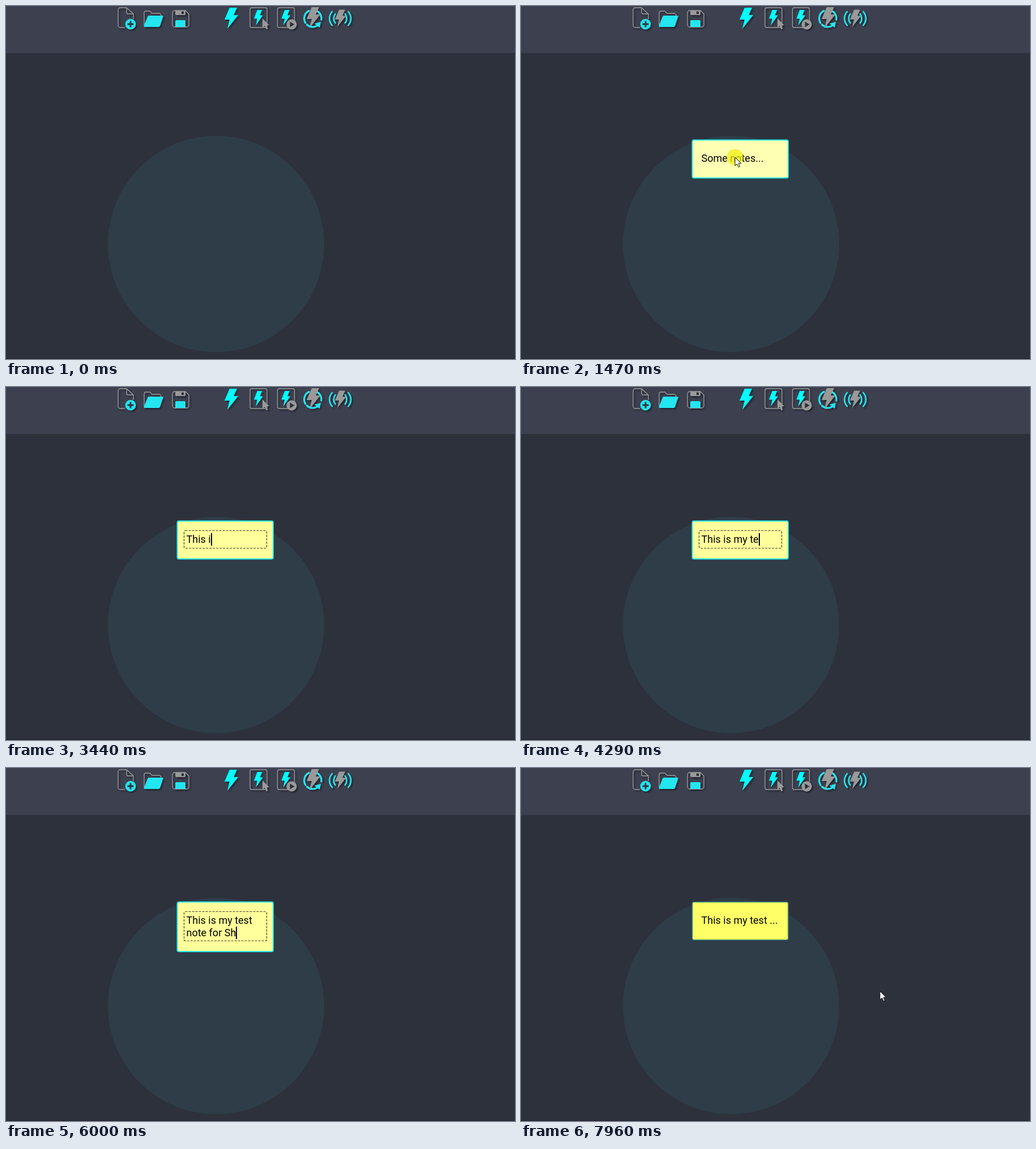
Animation of 899 by 623 pixels, one loop 8 s. Source, as an HTML page:

```html
<!DOCTYPE html>
<html lang="en">
<head>
<meta charset="utf-8">
<title>Editing a note</title>
<style>
  html, body { margin: 0; width: 100%; height: 100%; overflow: hidden; background: #2d313b; }
  svg { display: block; }
  text { font: 18px Roboto, "Liberation Sans", sans-serif; white-space: pre; }
  .icon { filter: url(#shade); }
  .line { fill: none; stroke: #999; stroke-width: 1.3; stroke-linejoin: round; }
  .grey { fill: #999; }
  .cyan { fill: #22e6f0; }
  .bright { fill: #0ff; }
  .dark { fill: #2d313b; }
  .wave { fill: none; stroke: #22e6f0; stroke-width: 2.6; stroke-linecap: round; }
</style>
</head>
<body>
<svg width="899" height="623" viewBox="0 0 899 623">
  <defs>
    <path id="bolt" d="M9 0H22L16 13H24L5 37L9 21H0Z"/>
    <path id="arrow" d="M0 0V15L3.6 11.8L6.2 17.5L8.6 16.4L6 10.9H10.8Z"/>
    <g id="page">
      <rect class="line" x="431" y="3" width="30" height="35" rx="3"/>
      <use href="#bolt" class="bright" transform="translate(438 7) scale(.65 .73)"/>
    </g>
    <filter id="shade" x="-20%" y="-20%" width="150%" height="150%">
      <feDropShadow dx="2.5" dy="2.5" stdDeviation=".8" flood-color="#20232c" flood-opacity=".85"/>
    </filter>
  </defs>

  <rect width="899" height="623" fill="#2d313b"/>
  <circle cx="371" cy="420" r="191" fill="#2e3d48"/>
  <rect width="899" height="83" fill="#3d414f"/>
  <rect y="622" width="899" height="1" fill="#23252d"/>

  <!-- toolbar -->
  <g class="icon">
    <path class="line" d="M210 38H202a4 4 0 0 1-4-4V7a4 4 0 0 1 4-4H213L225 14V23M213 3V11a3 3 0 0 0 3 3H225"/>
    <circle class="cyan" cx="220" cy="32" r="9.3"/>
    <path d="M220 26.5v11M214.5 32h11" stroke="#2d313b" stroke-width="3"/>
  </g>
  <g class="icon">
    <path class="line" d="M244 34V12a3 3 0 0 1 3-3H254L258 13H270a4 4 0 0 1 4 4"/>
    <path class="cyan" d="M253 17H276q2 0 1.4 2L272 35q-.6 2-3 2H245q-2 0-1.4-2L250 19q.7-2 3-2Z"/>
  </g>
  <g class="icon">
    <path class="line" d="M298 8H317L323 14V33a4 4 0 0 1-4 4H298a4 4 0 0 1-4-4V12a4 4 0 0 1 4-4Z"/>
    <path class="grey" d="M299 8H317V14a2 2 0 0 1-2 2H301a2 2 0 0 1-2-2ZM310 9.5v4.5h4v-4.5z"/>
    <path class="cyan" d="M299 37V27a2 2 0 0 1 2-2H315a2 2 0 0 1 2 2V37Z"/>
  </g>
  <use href="#bolt" class="icon bright" x="386" y="3"/>
  <g class="icon">
    <use href="#page"/>
    <use href="#arrow" class="grey" transform="translate(453 22) scale(1.1)"/>
  </g>
  <g class="icon">
    <use href="#page" x="48.5"/>
    <circle class="grey" cx="504.5" cy="32.5" r="9"/>
    <path class="dark" d="M501.5 27.5V37.5L509.5 32.5Z"/>
  </g>
  <g class="icon">
    <path class="wave" style="stroke-width:3.2" d="M535 8.5A15 15 0 0 0 529 30M531.5 33A15 15 0 0 0 550 34.5M549 8.5A15 15 0 0 1 557 24"/>
    <path class="cyan" d="M545 31L556 28L554 38Z"/>
    <use href="#bolt" class="grey" x="531" y="2"/>
  </g>
  <g class="icon">
    <path id="waves" class="wave" d="M576 10A18 18 0 0 0 576 34M581.5 14A13 13 0 0 0 581.5 30"/>
    <use href="#waves" transform="translate(1180.5 0) scale(-1 1)"/>
    <use href="#bolt" class="grey" transform="translate(581 6.5) scale(.82)"/>
  </g>

  <!-- note -->
  <g id="note">
    <rect id="card" x="302.5" y="236.5" width="169.5" rx="3"/>
    <rect id="frame" x="314.5" y="253.5" width="146" rx="2" fill="none"
          stroke="#3c3c34" stroke-width="1.2" stroke-dasharray="4 2"/>
    <rect id="mark" x="318" y="257" width="111" height="23" fill="#0078d7"/>
    <text id="row1" x="318.5" y="275"></text>
    <text id="row2" x="318.5" y="297"></text>
    <rect id="caret" width="2" height="22"/>
  </g>

  <circle id="spot" r="14.5" fill="#eeee10" fill-opacity=".72"/>
  <use id="mouse" href="#arrow" fill="#fff" stroke="#111"/>
</svg>

<script>
const LOOP = 8000, TICK = 85.5, ROW = 22;
const NOTE_IN = 1120, HOVER = 1470, EDIT = 1720, LEAVE = 1980, SAVE = 7610;
const $ = id => document.getElementById(id);
const pen = document.createElement('canvas').getContext('2d');
pen.font = '18px Roboto, "Liberation Sans", sans-serif';

// bursts of typing, one key per tick
const bursts = [
  ['T', 2750], ['hi', 2920], ['s ', 3190], ['is ', 3440], ['m', 3780], ['y tes', 3960],
  ['t ', 4550], ['note ', 4720], ['for ', 5240], ['S', 5650], ['h', 6000], ['o', 6170], ['p', 6330]
];
const keys = bursts.flatMap(([s, at]) => [...s].map((char, i) => ({ char, at: at + i * TICK })));
const firstRow = 'This is my test '.length;

// each move lasts until the next one, or until it is hidden
const enter = [795, 607], edge = [378, 267], note = [386, 270], away = [865, 454];
const back = [811, 440], click = [640, 503], rest = [634, 394];
const moves = [
  { at: 90, end: 680, from: enter, to: edge },
  { at: HOVER - 10, end: HOVER, from: edge, to: note },
  { at: LEAVE - TICK, end: 2220, from: note, to: away, hide: 2320 },
  { at: 7280, end: 7440, from: back, to: click },
  { at: SAVE, end: 7940, from: click, to: rest }
];
const clicks = [600, HOVER, HOVER + 2 * TICK, SAVE];

const show = (el, on) => el.setAttribute('visibility', on ? 'visible' : 'hidden');
const set = (el, attrs) => { for (const k in attrs) el.setAttribute(k, attrs[k]); };
const ramp = (t, from, to) => Math.min(1, Math.max(0, (t - from) / (to - from)));
const ease = p => p * p * (3 - 2 * p);
const lerp = (a, b, p) => a.map((v, i) => v + (b[i] - v) * p);
const mix = (a, b, p) => `rgb(${lerp(a, b, p).map(Math.round)})`;

function drawNote(t) {
  const typed = keys.filter(k => t >= k.at);
  const text = typed.map(k => k.char).join('');
  const editing = t >= EDIT && t < SAVE;
  const selected = editing && !text;

  let top = text.slice(0, firstRow) || 'Some notes...';
  let bottom = text.slice(firstRow);
  if (t >= SAVE) [top, bottom] = ['This is my test ...', ''];
  $('row1').textContent = top;
  $('row2').textContent = bottom;
  $('row1').setAttribute('fill', selected ? '#fff' : '#000');

  const extra = bottom ? ROW - 1.5 : 0;
  const hover = t >= HOVER && t < LEAVE;
  const blur = ramp(t, SAVE, 7940);
  set($('card'), {
    height: 67 + extra,
    fill: hover ? '#ffffb4' : mix([255, 255, 155], [255, 255, 102], blur),
    stroke: mix([38, 232, 232], [48, 126, 122], blur),
    'stroke-width': 2 - blur * .4
  });
  $('frame').setAttribute('height', 31 + extra);
  set($('caret'), {
    x: Math.round(318.5 + pen.measureText(bottom || top).width),
    y: bottom ? 258 + ROW : 258
  });

  // the caret stays on right after a key, then blinks
  const idle = t - (typed.length ? typed[typed.length - 1].at : EDIT);
  const blink = Math.floor((idle + 150) / 420) % 2 === 0;
  show($('note'), t >= NOTE_IN);
  $('note').style.display = t >= NOTE_IN ? '' : 'none';
  show($('frame'), editing);
  show($('mark'), selected);
  show($('caret'), editing && blink);
}

function drawMouse(t) {
  const now = Math.floor(t / TICK) * TICK + 4;
  const move = moves.filter(m => t >= m.at).pop();
  const on = move && !(t >= move.hide);
  show($('mouse'), on);
  show($('spot'), on && clicks.some(c => t >= c && t < c + TICK));
  if (!on) return;
  const [x, y] = lerp(move.from, move.to, ease(ramp(now, move.at, move.end)));
  $('mouse').setAttribute('transform', `translate(${x} ${y})`);
  set($('spot'), { cx: x, cy: y });
}

const start = performance.now();
function tick() {
  const t = (performance.now() - start) % LOOP;
  drawNote(t);
  drawMouse(t);
  requestAnimationFrame(tick);
}
tick();
</script>
</body>
</html>
```
